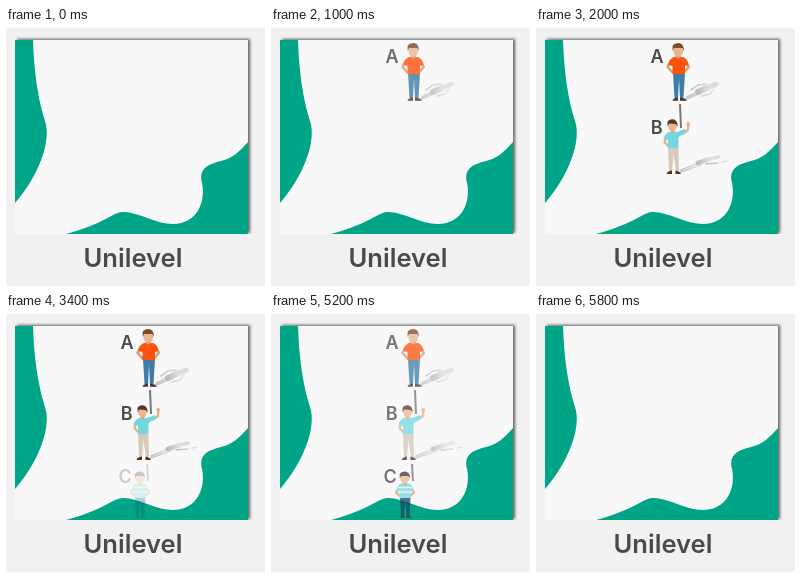
These frames come from a looping animation (259 by 258 pixels, 6.4 s). An HTML page:

```html
<!DOCTYPE html>
<html lang="en">
<head>
<meta charset="utf-8">
<title>Unilevel</title>
<style>
  html, body { margin: 0; width: 100%; height: 100%; overflow: hidden; background: #f1f1f1; }
  svg { display: block; width: 259px; height: 258px; }
  text { font-family: Inter, "Open Sans", sans-serif; font-weight: 600; fill: #4a4a4a; }
  .tag { font-size: 18px; }
  .level { opacity: 0; }
  .limb { fill: none; stroke-linecap: round; stroke-linejoin: round; }
  .panel { filter: drop-shadow(2px -1px 1.5px rgba(0, 0, 0, .6)); }
</style>
</head>
<body>
<svg viewBox="0 0 259 258">
  <defs>
    <clipPath id="edge"><path d="M9 0H259V206H9Z"/></clipPath>
    <linearGradient id="cast" x1="0" x2="1">
      <stop offset="0" stop-color="#bdbdbd"/>
      <stop offset="1" stop-color="#e2e2e2"/>
    </linearGradient>
  </defs>

  <g clip-path="url(#edge)"><rect class="panel" x="9" y="12" width="233" height="194" fill="#f8f8f8"/></g>
  <g fill="#00a587">
    <path d="M9 12H27C28 44 32 72 39 93C46 113 32 149 9 175Z"/>
    <path d="M242 114C233 124 227 130 215 133C199 137 193 142 196 155C200 174 191 196 167 196C149 196 131 183 116 184C106 185 100 195 60 206H242Z"/>
  </g>
  <text x="77.5" y="239" font-size="25.6">Unilevel</text>

  <g class="level" id="a">
    <g fill="none" stroke="url(#cast)" stroke-linecap="round">
      <path d="M147 72L165 65M151 69L166 62" stroke-width="2"/>
      <path d="M162 64L173 59" stroke-width="6"/>
      <path d="M155 62L162 57L170 56M166 68L174 66L178 61" stroke-width="1.5"/>
    </g>
    <ellipse cx="178" cy="57" rx="5" ry="2.7" fill="#dedede" transform="rotate(-20 178 57)"/>
    <path d="M137 45H149L147.5 70H144L143 51L142 70H138.5Z" fill="#3f7da8"/>
    <path d="M136.500 72.800Q137 70 142 69.500V72.800ZM144 69.500Q149 70 151 72.800H144Z" fill="#49352f"/>
    <path class="limb" d="M134.500 33L131.500 39L137 45M150 33L152.800 39L147.500 45" stroke="#d99b72" stroke-width="2.500"/>
    <path d="M138 29H147Q151 30 152.500 37L149 38V46H136.500V38L132 37Q134 30 138 29Z" fill="#ff520d"/>
    <path d="M139.500 26H145V29Q142.300 32 139.500 29Z" fill="#d99b72"/>
    <path d="M137.300 19H147.200V23Q146.500 28.500 142.200 28.500Q138 28.500 137.300 23Z" fill="#e8b78f"/>
    <path d="M136.600 23V18Q138 15 143 15Q148 15.500 147.800 23L146.500 20H138Z" fill="#7b4b2b"/>
    <text class="tag" x="114.600" y="35">A</text>
  </g>

  <g class="level" id="b">
    <path d="M144 76L145 100" stroke="#777" stroke-width="2"/>
    <g fill="none" stroke="url(#cast)" stroke-linecap="round">
      <path d="M142 145L165 137M145 142L163 135" stroke-width="1.800"/>
      <path d="M162 135L174 131" stroke-width="5"/>
      <path d="M170 136L182 135M186 134L191 133" stroke-width="1.400"/>
    </g>
    <ellipse cx="180" cy="129.500" rx="4.500" ry="2" fill="#dedede" transform="rotate(-12 180 129.500)"/>
    <path d="M132 120H142.500L143 143H140L137.500 126L136 143H133Z" fill="#d6cabb"/>
    <path d="M130.500 146Q131 143 136 142.500V146ZM139.500 142.500Q143.500 143 145 146H139.500Z" fill="#49352f"/>
    <path class="limb" d="M130 109L128.500 114L133 119M147 105.500L152 102L152.300 96" stroke="#e3b18b" stroke-width="2.300"/>
    <circle cx="152.200" cy="96" r="2" fill="#e3b18b"/>
    <path d="M133 104H141L149 101L150.500 104.500L142.500 109V120H132V112L127.500 111Q129 105 133 104Z" fill="#74d7e0"/>
    <path d="M134.500 101H138.500V104L136.500 105.500L134.500 104Z" fill="#d99b72"/>
    <path d="M132 95H141V98Q140 103.500 136.500 103.500Q133 103.500 132 98Z" fill="#e8b78f"/>
    <path d="M131.500 98.500V94Q133 91 137 91.300Q141.800 92 141.500 98.500L139.800 96L133 95.500Z" fill="#59362b"/>
    <text class="tag" x="114.700" y="106">B</text>
  </g>

  <g class="level" id="c">
    <path d="M141 150L142 167" stroke="#777" stroke-width="2"/>
    <path d="M129 183H139.500L138.500 202H135.500L134.300 187L133 202H130Z" fill="#17465f"/>
    <path d="M128.500 204Q129 201.500 133.500 201.500V204ZM135.300 201.500Q139.500 201.500 141 204H135.300Z" fill="#49352f"/>
    <path class="limb" d="M127.500 174L125 178.500L129.500 182.500M140.500 174L143 178.500L138.500 182.500" stroke="#d99b72" stroke-width="2.200"/>
    <path d="M130 169.500H138Q141.500 170.500 142.500 176.500L139.500 177V184H128.500V177L125.500 176.500Q126.500 170.500 130 169.500Z" fill="#74d7e0"/>
    <path d="M127 173.500H141M128.500 178H139.500" stroke="#d9f5f5" stroke-width="1.600"/>
    <path d="M131.700 167H136V170L134 171.500L131.700 170Z" fill="#d99b72"/>
    <path d="M129 161H138.500V164Q137.500 169.300 133.800 169.300Q130 169.300 129 164Z" fill="#e8b78f"/>
    <path d="M128.700 164.500V160Q130 157.300 134 157.500Q139.300 158 138.800 164.500L137.500 162H130Z" fill="#3b302e"/>
    <text class="tag" x="112.400" y="169">C</text>
  </g>
</svg>
<script>
  const LOOP = 6400, STEP = 200, FADE_OUT = 5200;
  const levels = [
    { id: "a", start: 400, steps: 5 },
    { id: "b", start: 1400, steps: 4 },
    { id: "c", start: 3400, steps: 4 }
  ].map(level => ({ ...level, node: document.getElementById(level.id) }));

  const progress = (time, start, steps) =>
    Math.min(1, Math.max(0, (Math.floor((time - start) / STEP) + 1) / steps));

  function draw(now) {
    const time = now % LOOP;
    for (const { node, start, steps } of levels) {
      node.style.opacity = progress(time, start, steps) * (1 - progress(time, FADE_OUT, 4));
    }
  }

  const origin = performance.now();
  function tick() {
    draw(performance.now() - origin);
    requestAnimationFrame(tick);
  }
  tick();
</script>
</body>
</html>
```
